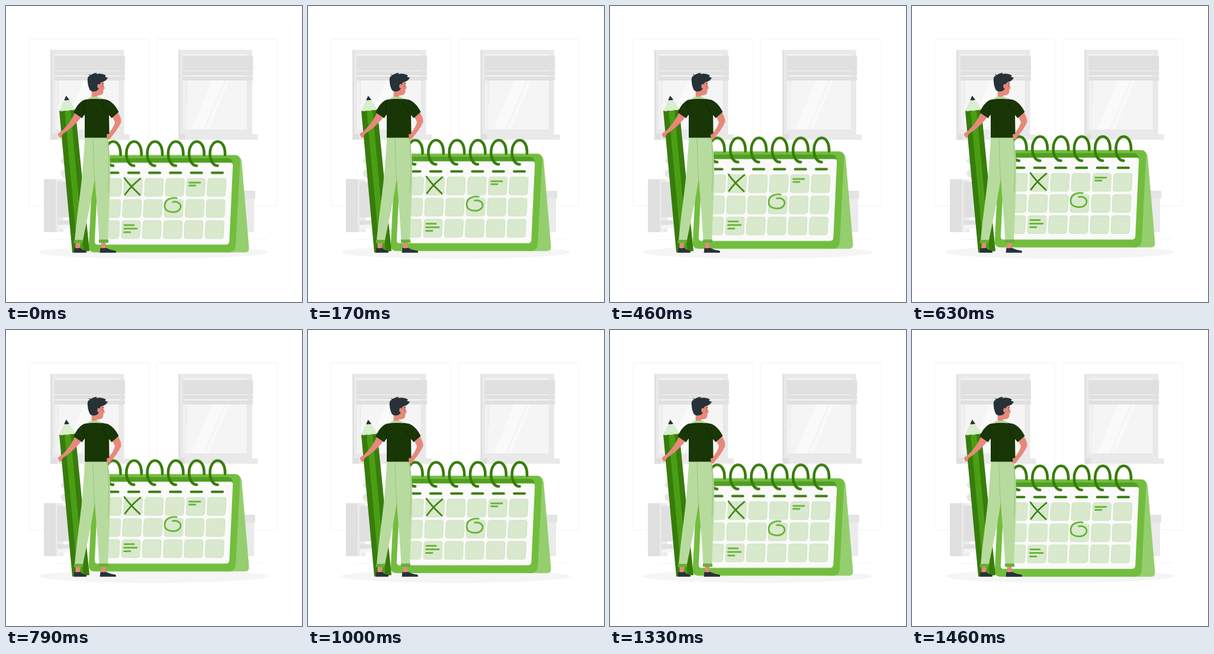
Animation of 500x500 px, one loop 1.5 s. Source, as an HTML page:

```html
<!DOCTYPE html>
<html lang="en">
<head>
<meta charset="utf-8">
<title>Calendar planning</title>
<style>
  html, body { margin: 0; width: 100%; height: 100%; overflow: hidden; background: #fff; }
  svg { display: block; width: 100vw; height: 100vh; }
  #calendar { animation: float 1.5s linear -40ms infinite; }
  @keyframes float {
    50% { transform: translateY(-10px); }
  }
  .line { fill: none; stroke-linecap: round; stroke-linejoin: round; }
  .skin { fill: #e6897b; }
  .ink { fill: #263238; }
  .cell { fill: #d9e9cd; stroke: #bcdba8; stroke-width: .6; }
</style>
</head>
<body>
<svg viewBox="0 0 500 500">
  <defs>
    <g id="window">
      <path fill="#e9e9e9" d="M75 74H199.500V217H209V226H75Z"/>
      <path fill="#dfdfdf" d="M75 74H77.500V216H86V226H75Z"/>
      <path fill="#f1f1f1" d="M82.500 81H191V209H82.500Z"/>
      <path fill="#f5f5f5" d="M88.500 84H190V208H88.500Z"/>
      <path fill="#fafafa" d="M132 125H152L117 208H97ZM156 125H161L126 208H121Z"/>
      <path fill="none" stroke="#e6e6e6" d="M88.500 125V165M191.500 82V208"/>
      <g fill="#e0e0e0">
        <rect x="82" y="84.500" width="119" height="24.500" rx="1"/>
        <rect x="82" y="110" width="119" height="7" rx="1"/>
        <rect x="82" y="119" width="119" height="6.700" rx="1"/>
      </g>
    </g>
    <path id="ring" class="line" stroke="#387c0c" stroke-width="4.600"
      d="M370 252C370.500 238 365 229.500 357.500 229.500C350 229.500 344.500 239 344.500 250C344.500 261.500 350 270.300 357.500 270.300"/>
  </defs>

  <g id="room">
    <g fill="#fff" stroke="#f3f3f3">
      <rect x="38.800" y="55.500" width="203" height="282" rx="2"/>
      <rect x="254.800" y="55.500" width="203" height="282" rx="2"/>
    </g>
    <use href="#window"/>
    <use href="#window" x="216.400"/>
    <path fill="#ebebeb" d="M82 292.500H97V382H82Z"/>
    <path fill="#e0e0e0" d="M64 292.500H84V382H64ZM87 297H118V357H87ZM87 362H118V369.500H87Z"/>
    <path fill="#f5f5f5" d="M88 370H118V376H90V382H88Z"/>
    <path fill="#e6e6e6" d="M100 256C92 257 91 263 95 266L102 269ZM101 277C92 276 90 282 95 288L101 292Z"/>
    <path fill="#ebebeb" d="M380 325H419V382H380Z"/>
    <rect x="370" y="312" width="51" height="13.500" rx="1" fill="#e4e4e4"/>
    <path stroke="#f4f4f4" d="M80 394.500H410M418 393.500H440"/>
    <ellipse cx="249.500" cy="416" rx="193.500" ry="11" fill="#f5f5f5"/>
  </g>

  <g id="calendar">
    <path fill="#95ce6e" d="M386 253Q397 254 398 263L410.500 409Q411 416.700 404 416.700H370Z"/>
    <path fill="#72bd3e" d="M156 252.200H387Q396 252.500 395.500 262L388 405Q387 416.700 376 416.700H150Q139 416.700 139.800 406L147 262Q148 252.200 156 252.200Z"/>
    <path fill="#519f22" d="M160 257.500H375Q382 258 383 265.500H156Z"/>
    <path fill="#fafafa" d="M160 265.300H379Q383.500 265.300 383.200 270L377.300 398Q377 403.500 371 403.500H155Q149.500 403.500 149.800 398L156 270Q156 265.300 160 265.300Z"/>
    <g id="cells" transform="translate(0 291.700) skewX(-2.800)"></g>
    <g id="dashes" class="line" stroke="#387c0c" stroke-width="4"></g>
    <path class="line" stroke="#3c820c" stroke-width="2.700" d="M200 291C207 301 217 311 226 319.500M227 292C217 300 208 309 201 319"/>
    <path class="line" stroke="#62b232" stroke-width="2.700" d="M288.500 325C278 323 268 328 268 338C268 346 275 349 283 348.700C291 348.300 296.500 343 294.700 337C293 332 287 330.500 281.500 331.500"/>
    <path class="line" stroke="#62b232" stroke-width="2.800" d="M309.500 298.800H328M309.500 303.900H320M200 370.700H216M199.500 376.700H221M199.500 382.700H210"/>
    <g id="rings"></g>
  </g>

  <g id="pencil">
    <path fill="#387c0c" d="M90 177L117 174.500L141 414L112 416.500Z"/>
    <path fill="#4a9e13" d="M99 176L109 175L131 415L121 416Z"/>
    <path fill="#d9edcf" d="M90 177L98.500 158.500L106.500 158L117 174.500Q112 177 108.500 175.500Q104 178 99.500 176.500Q95 178.500 90 177Z"/>
    <path class="ink" d="M98.300 159L101.500 151.500L107 158.300Q103 160 98.300 159Z"/>
  </g>

  <g id="man">
    <path class="skin" d="M117.500 399H126L124.500 412H117.500ZM160.500 399H168.500V412H160.500Z"/>
    <path class="ink" d="M115.500 408.500Q120 410 125 408.500Q129 412.500 135 413.500Q137 415 135.500 416.700H114.500ZM159.500 408.500Q164 410 169 408.500Q177 412.500 184 413Q187 414.500 185.500 416.700H158.500Z"/>
    <path fill="#b7db9e" d="M133.500 221H153L152 270C149 310 137 360 130 396H116C120 350 127 310 130 270Z"/>
    <path fill="#b7db9e" d="M146.500 221H171.500C177 250 176.500 285 175.500 310C174.500 340 173 370 172 396H157.500C156 365 153 330 150 295C148.500 265 147 245 146.500 221Z"/>
    <path class="line" stroke="#8fbd72" stroke-width=".8" d="M147 224C148 255 148 275 150.500 302M171 224C175 255 174 290 172 315"/>
    <path fill="#64b236" d="M115 395H130.500L129.500 400.500H114.500ZM157 394.500H173V400H157Z"/>

    <path class="skin" d="M117 179L127 188C119 199 107 209 96 216L93 222Q90 224 89.500 220Q86.500 218 88.500 215L95 210.500C104 202 111 192 117 179Z"/>
    <path class="skin" d="M180 188L188.500 179C192 184 195 190 194.500 196C190 206 184 214 178 221Q174 227 170.500 224.500L170 217L174 215C180 207 183 201 184 196Z"/>
    <path fill="#183606" d="M132 158.500Q152 154 171 158.500C180 162 186 170 190.500 179L178.500 189.500L174 184L174.500 222.500H133L133 183L128.500 189.500L114.500 180C118 171 123 163 132 158.500Z"/>
    <path class="line" stroke="#0f2403" stroke-width=".7" d="M133 184C131 175 131 168 132 163M174 184C168 177 165 171 163 165"/>
    <path class="skin" d="M170 217L175 215.500L179 219L174 226L170.500 223Z"/>

    <path class="skin" d="M145 140L155 130L165 127Q164.500 131 165 134L167 139L164.500 141Q165 148 161 150Q157 151.500 154 151L153.500 156H144.500Z"/>
    <path fill="#b7db9e" d="M138.500 157.500Q140 153.500 145 153.500L154 153Q160 153.500 161.500 157.500Q150 155.800 138.500 157.500Z"/>
    <path class="ink" d="M138 128C137 121 139 118 142 118L139.500 115Q143 117 145 115.500Q149 112.500 153.500 113L152.500 115Q161 113 168.500 117L167.500 120L172 121Q169 127 163 128L159 130Q159.500 135 157 139Q155 144 148 144.500Q142 145 140 138Q138 133 138 128Z"/>
    <ellipse class="skin" cx="156.800" cy="135.500" rx="2.600" ry="3.700"/>
    <path class="line" stroke="#263238" stroke-width=".8" d="M162.500 131.500L165 130.800M163 134.500V135.800"/>
  </g>
</svg>
<script>
  const pitch = 35.3;
  const fill = (id, count, draw) =>
    document.getElementById(id).innerHTML = Array.from({ length: count }, (_, i) => draw(i)).join('');

  fill('cells', 18, i =>
    `<rect class="cell" x="${341 - pitch * (i % 6)}" y="${35.7 * Math.floor(i / 6)}" width="31" height="30.200" rx="4"/>`);
  fill('dashes', 6, i => `<path d="M${348 - pitch * i} 282.200h18"/>`);
  fill('rings', 6, i => `<use href="#ring" x="${-pitch * i}"/>`);
</script>
</body>
</html>
```
